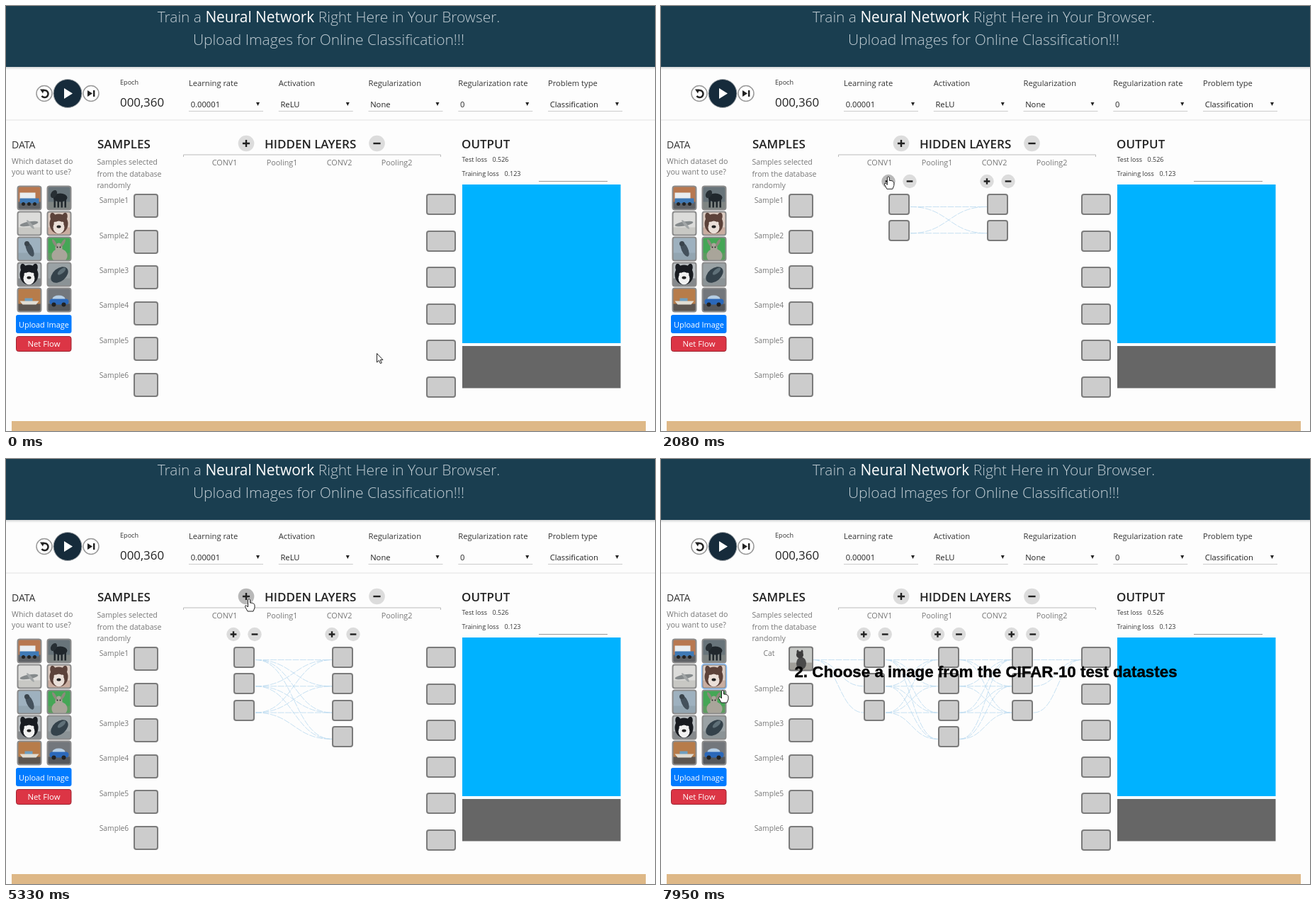
An HTML page for the animation above (8000 ms loop, 916 by 600 pixels).

```html
<!DOCTYPE html>
<html lang="en">
<head>
<meta charset="utf-8">
<title>Neural network builder</title>
<style>
html, body { margin: 0; width: 100%; height: 100%; overflow: hidden; background: #fdfdfd; }
svg { display: block; width: 916px; height: 600px; font-family: "Open Sans", "Noto Sans", sans-serif; }
text { white-space: pre; }
</style>
</head>
<body>
<svg id="stage" viewBox="0 0 916 600" xmlns="http://www.w3.org/2000/svg">
  <defs>
    <linearGradient id="shade" x2="0" y2="1"><stop stop-color="#d4d6d7"/><stop offset="1" stop-color="#fdfdfd"/></linearGradient>
    <clipPath id="thumb"><rect width="33" height="33" rx="3"/></clipPath>
  </defs>
  <g id="page"></g>
  <g id="network"></g>
  <g id="caption"></g>
  <g id="pointer"></g>
</svg>
<script>
const LOOP = 8000, STEP = 76;
const $ = id => document.getElementById(id);
const range = (n, f) => Array.from({ length: n }, (_, i) => f(i)).join('');
const each = (list, f) => list.map(f).join('');

const text = (x, y, size, str, fill = '#333', extra = '') =>
  `<text x="${x}" y="${y}" font-size="${size}" fill="${fill}" ${extra}>${str}</text>`;
const rect = (x, y, w, h, fill, extra = '') =>
  `<rect x="${x}" y="${y}" width="${w}" height="${h}" fill="${fill}" ${extra}/>`;
const circle = (x, y, r, fill, extra = '') =>
  `<circle cx="${x}" cy="${y}" r="${r}" fill="${fill}" ${extra}/>`;
const oval = (x, y, rx, ry, fill, turn = 0) =>
  `<ellipse rx="${rx}" ry="${ry}" fill="${fill}" transform="translate(${x} ${y}) rotate(${turn})"/>`;
const path = (d, fill, extra = '') => `<path d="${d}" fill="${fill}" ${extra}/>`;
const line = (d, color, w = 1, extra = '') =>
  path(d, 'none', `stroke="${color}" stroke-width="${w}" ${extra}`);
const box = (x, y, w, h) => rect(Math.round(x) + 1, Math.round(y) + 1, w - 2, h - 2, '#ccc',
  'rx="3" stroke="#7b7b7b" stroke-width="2"');
const MIDDLE = 'text-anchor="middle"', SEMI = 'font-weight="600"';

function button(x, y, r, sign, hot) {
  const k = r * 0.45;
  return circle(x, y, r, hot ? '#b8b8b8' : '#dcdcdc') +
    line(`M${x - k} ${y}h${2 * k}` + (sign > 0 ? `M${x} ${y - k}v${2 * k}` : ''), '#222', 2.4);
}

// Simple subjects for the small pictures, in a 33 px square.
const truck = (body, trim) => rect(3, 9, 22, 9, body) + rect(3, 17, 27, 7, trim) +
  range(3, i => circle(8 + 8 * i, 25, 2.5, '#222'));
const car = (body, trim) => oval(16, 15, 9, 5, trim) + rect(3, 15, 27, 8, body, 'rx="4"') +
  range(2, i => circle(9 + 14 * i, 23, 3, '#222'));
const boat = (body, trim) => rect(10, 14, 11, 5, trim) + path('M3 18H30L26 23H7Z', body);
const plane = (body, trim) => oval(16, 17, 13, 3, body, -10) + oval(18, 18, 8, 2, trim, 50);
const bird = (body, trim) => oval(17, 17, 4.5, 11, body, -25) + circle(13, 9, 3.5, trim);
const beast = (body, trim) => oval(18, 16, 10, 6, body) + oval(9, 11, 4, 6, trim, 30) +
  range(4, i => rect(9 + 5 * i, 17, 2.5, 13, body));
const deer = (body, trim) => oval(17, 26, 11, 10, body) + oval(16, 15, 5, 7, body) +
  range(2, i => oval(10 + 12 * i, 8, 2, 6, trim, -30 + 60 * i) + circle(14 + 4 * i, 14, 1, '#222'));
const frog = (body, trim) => oval(17, 17, 14, 9, body, -40) + oval(20, 12, 7, 3, trim, -40);
const face = (body, trim) => oval(16, 17, 13, 14, trim) + oval(16, 22, 8, 9, body) +
  range(2, i => oval(8 + 16 * i, 8, 4, 7, trim, -15 + 30 * i) + circle(11 + 10 * i, 16, 2, body)) +
  oval(16, 21, 3, 2, '#222');
const sitter = (body, trim) => oval(17, 23, 7, 9, body) + circle(15, 11, 5, trim) +
  range(2, i => oval(12 + 6 * i, 7, 1.5, 3, trim));

// Subject, its two colours, then backdrop and ground.
const pictures = [
  [truck, '#e9edf0', '#3f79b5', '#b87850', '#5f6266'],
  [beast, '#20272c', '#272f34', '#68747a', '#7f8583'],
  [plane, '#858a8c', '#a2a6a7', '#dcdcda', '#c8c8c4'],
  [face, '#eadfd8', '#5c423a', '#dcccc2', '#c9ada0'],
  [bird, '#44515c', '#3a444c', '#9eb1bf', '#93a5b1'],
  [deer, '#a9a59a', '#8d8a7c', '#45a656', '#5d9c60'],
  [face, '#f1f1f1', '#181b20', '#b9bec1', '#85898c'],
  [frog, '#34424b', '#5f7078', '#9aa2a5', '#8b9396'],
  [boat, '#e1ddd3', '#6f9fc0', '#b77c4a', '#5d5650'],
  [car, '#2b68b9', '#b6cee4', '#73777c', '#55585c']
];
const sampleCat = [sitter, '#4a4a4a', '#3c3c3c', '#c6c8c5', '#a09e98'];
const picture = (x, y, [subject, body, trim, back, ground], border) =>
  `<g transform="translate(${x} ${y})"><g clip-path="url(#thumb)">` +
  rect(0, 0, 33, 33, back) + rect(0, 22, 33, 11, ground) + subject(body, trim) + '</g>' +
  rect(0, 0, 33, 33, 'none', `rx="3" stroke="${border}" stroke-width="2"`) + '</g>';

function drawHeader() {
  const pale = '#c2ced5', style = 'font-weight="300" ' + MIDDLE;
  return rect(0, 86, 916, 4, 'url(#shade)') + rect(0, 0, 916, 86, '#1a3e50') +
    text(455.5, 23, 20.9, 'Train a <tspan fill="#fff" font-weight="500">Neural Network</tspan>' +
      ' Right Here in Your Browser.', pale, style) +
    text(455.5, 55, 21, 'Upload Images for Online Classification!!!', pale, style);
}

function drawToolbar() {
  const fields = [['Learning rate', '0.00001'], ['Activation', 'ReLU'], ['Regularization', 'None'],
    ['Regularization rate', '0'], ['Problem type', 'Classification']];
  return rect(0, 160, 916, 2, '#f0f0f0') +
    each([54, 120], x => circle(x, 123.5, 11, '#fff', 'stroke="#999" stroke-width="1.5"')) +
    circle(87, 123.5, 20, '#162b3b', 'stroke="#a5a9ac"') + path('M82 116L94 123.5 82 131Z', '#fff') +
    line('M51 120.5A5 5 0 1 1 50.5 127', '#222', 2.5) + path('M48 117.5h6l-2 6Z', '#222') +
    path('M115 119L122 123.5 115 128ZM123 119h2.4v9h-2.4Z', '#222') +
    text(161, 111, 9.1, 'Epoch') + text(161, 142, 16.9, '000,360', '#222') +
    each(fields, ([label, value], i) => {
      const x = 258 + i * 126.75;
      return text(x, 113, 11.2, label) + text(x + 2.7, 142.5, 11.2, value, '#222') +
        rect(x, 148, 105, 1, '#ccc') + path(`M${x + 95} 136h5l-2.5 5Z`, '#222');
    });
}

function drawPanels() {
  const grey = '#777';
  const lines = (x, y, gap, size, list) => each(list, (s, i) => text(x, y + gap * i, size, s, grey));
  return text(8, 201, 14, 'DATA') + text(129, 201, 17, 'SAMPLES', '#222', SEMI) +
    text(365, 201, 17, 'HIDDEN LAYERS', '#222', SEMI) + text(643, 201, 17, 'OUTPUT', '#222', SEMI) +
    lines(8, 223, 15, 10.7, ['Which dataset do', 'you want to use?']) +
    lines(128.5, 224, 16.5, 10.6, ['Samples selected', 'from the database', 'randomly']) +
    line('M250.5 213v-3H613.5v3', '#bbb') +
    each(['CONV1', 'Pooling1', 'CONV2', 'Pooling2'], (s, i) => text(308.5 + 81 * i, 224.5, 10.8, s, grey, MIDDLE)) +
    text(643.5, 220, 9, 'Test loss') + text(686.5, 220, 9, '0.526') +
    text(643.5, 240, 9, 'Training loss') + text(703.5, 240, 9, '0.123') +
    rect(752, 247, 97, 1, '#999') + rect(644, 252, 223.5, 224, '#00b2ff') +
    rect(644, 480, 223.5, 59.5, '#666') + rect(8, 586, 895, 14, '#deb887') +
    each(pictures, (p, i) => picture(16.5 + 42 * (i % 2), 254.5 + 36 * (i >> 1), p, '#8b8b8b')) +
    rect(14, 436, 78.5, 26, '#007bff', 'rx="3"') + text(53.5, 454, 10.9, 'Upload Image', '#fff', MIDDLE) +
    rect(14.5, 466.5, 77.5, 21, '#dc3545', 'rx="3" stroke="#9c2430"') + text(53.5, 481, 11.4, 'Net Flow', '#fff', MIDDLE) +
    range(6, i => box(180, 265 + 50.6 * i, 35, 34) + box(593, 265 + 51.5 * i, 42, 30)) +
    range(5, i => text(152.5, 327.5 + 49.4 * i, 10.3, `Sample${i + 2}`, grey, MIDDLE));
}

// Node counts per layer from a given time on.
const builds = [[0, []], [1310, [2]], [1630, [2, 2]], [2780, [3, 2]], [4030, [3, 3]],
  [4330, [3, 4]], [5400, [3, 4, 2]], [6710, [3, 4, 3]]];
const PICKED = 7870;

const linear = p => p, easeIn = p => p * p, easeOut = p => 1 - (1 - p) ** 3;
// Pointer moves: start, end, easing, goal and the point passed halfway along the curve.
const home = [523, 490];
const moves = [
  [60, 850, linear, [345, 200], [235, 300]],
  [1150, 1150, linear, [345, 197]],
  [1630, 2080, linear, [316, 249]],
  [2240, 2380, linear, [317, 248]],
  [3110, 3870, linear, [459, 247], [400, 296]],
  [4560, 5330, linear, [343, 197], [400, 268]],
  [5400, 6170, easeIn, [490, 262], [373, 228]],
  [6250, 6480, linear, [491, 249]],
  [7020, 7570, easeOut, [88, 339], [276, 346]],
  [7720, 7950, linear, [87, 326]]
];

function pointerAt(t) {
  const i = moves.findLastIndex(m => m[0] <= t);
  if (i < 0) return home;
  const [start, end, ease, goal, via] = moves[i];
  const from = i ? moves[i - 1][3] : home;
  const steps = Math.round((end - start) / STEP);
  const p = steps ? ease(Math.min(1, Math.floor((t - start) / STEP) / steps)) : 1;
  return from.map((a, k) => {
    const b = goal[k], bend = via ? via[k] - (a + b) / 2 : 0;
    return a + (b - a) * p + 4 * bend * p * (1 - p);
  });
}

const layerX = (i, n) => 197 + 417 * (i + 1) / (n + 1);
const linkY = i => 283.5 + 37.3 * i;
function link(x1, y1, x2, y2) {
  const m = (x1 + x2) / 2;
  return line(`M${x1} ${y1}C${m} ${y1} ${m} ${y2} ${x2} ${y2}`, '#c0ddf1', 0.9, 'stroke-dasharray="9 1.5"');
}

function network(t, [px, py]) {
  const layers = builds.findLast(b => b[0] <= t)[1], n = layers.length, picked = t >= PICKED;
  let links = '', nodes = '', hand = px > 57 && px < 93 && py > 289 && py < 433;
  const control = (x, y, r, sign) => {
    const hot = Math.hypot(px - x, py - y) < r;
    hand = hand || hot;
    return button(x, y, r, sign, hot);
  };
  nodes += control(339, 194, 11.3, 1) + control(523.5, 194, 11.3, -1);
  layers.forEach((count, i) => {
    const x = layerX(i, n);
    nodes += control(x - 15, 247.5, 9.7, 1) + control(x + 15, 247.5, 9.7, -1) +
      range(count, k => box(x - 15, 265 + 37.3 * k, 30, 30));
    links += range(count, k => range(layers[i + 1] || 0, j =>
      link(x + 16, linkY(k), layerX(i + 1, n) - 15, linkY(j))));
    if (picked && i === 0) links += range(count, k => link(215, 283.5, x - 15, linkY(k)));
    if (picked && i === n - 1) links += range(count, k => link(x + 16, linkY(k), 593, 283.5));
  });
  const sample = text(152.5, 278, 10.3, picked ? 'Cat' : 'Sample1', '#777', MIDDLE) +
    (picked ? picture(181, 265.5, sampleCat, '#787878') +
      rect(57.5, 289.5, 35, 35, 'none', 'rx="4" stroke="#8fc4ff" stroke-width="1.5"') : '');
  return { svg: links + nodes + sample, hand };
}

function caption(t) {
  const str = t >= 1310 && t < 1860 ? '1. Build your NetWork'
    : t >= 7490 ? '2. Choose a image from the CIFAR-10 test datastes' : '';
  return text(458.5, 308.3, 22.35, str, '#000', MIDDLE + ' font-weight="700" stroke="#000" stroke-width=".4"' +
    ' font-family="Liberation Sans, Arial, sans-serif"');
}

const ARROW = 'M.5 .5V13L3.4 10.3 5.4 14.7 7.3 13.8 5.3 9.6H9Z';
const HAND = 'M-1.5 10V1.5Q0-.5 1.5 1.5V6Q8 6 8 10V13L6 18H-2L-5.5 11.5Q-5.5 9-3.5 10L-1.5 12Z';

function render(t) {
  const at = pointerAt(t), { svg, hand } = network(t, at);
  $('network').innerHTML = svg;
  $('caption').innerHTML = caption(t);
  $('pointer').innerHTML = path(hand ? HAND : ARROW, '#fff',
    `stroke="#222" stroke-linejoin="round" transform="translate(${at})"`);
}

$('page').innerHTML = rect(0, 0, 916, 600, '#fdfdfd') + drawHeader() + drawToolbar() + drawPanels();
const began = performance.now();
(function tick() {
  render((performance.now() - began) % LOOP);
  requestAnimationFrame(tick);
})();
</script>
</body>
</html>
```
